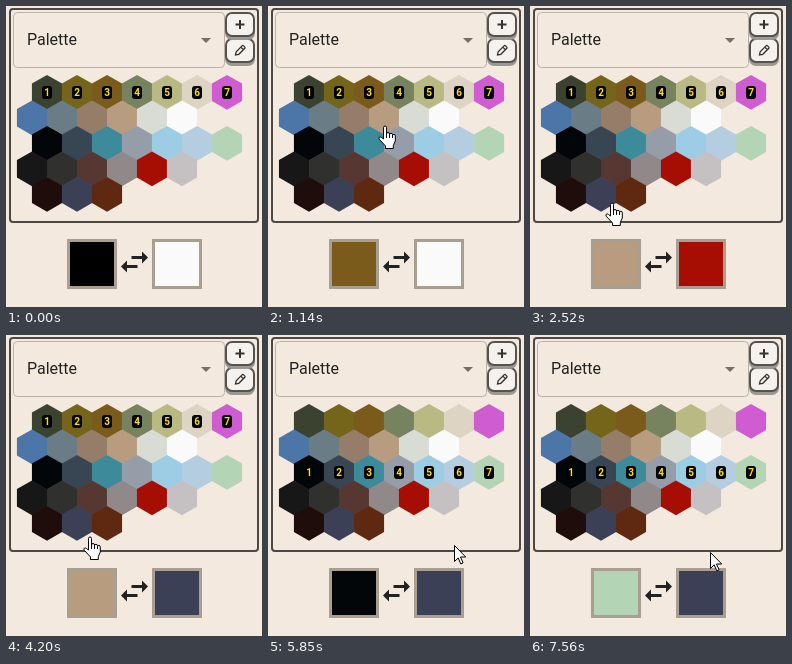
An HTML page with a canvas that plays this animation: 256x301 px, repeating every 8000 ms.

```html
<!DOCTYPE html>
<html lang="en">
<head>
<meta charset="utf-8">
<title>Palette</title>
<style>
  html, body { margin: 0; width: 100%; height: 100%; overflow: hidden; background: #f3e9de; }
  canvas { display: block; }
</style>
</head>
<body>
<canvas id="stage" width="256" height="301"></canvas>
<script>
const ctx = document.getElementById('stage').getContext('2d');
const LOOP = 8000, STEP = 30;

const palette = [
  ['#3c4230', '#75651b', '#7a5b1c', '#77835f', '#b9b984', '#ded4c4', '#cf5dd1'],
  ['#4c76a8', '#6a7c85', '#967d6a', '#b89c80', '#d9dbd5', '#fafafa'],
  ['#020608', '#384653', '#3d8a9b', '#959da8', '#9dcce5', '#b5cde1', '#b4d4b6'],
  ['#171717', '#30302f', '#563732', '#908889', '#a60d03', '#c5c1c2'],
  ['#1e0d0b', '#3c4057', '#5f2810'],
];
const cells = palette.flatMap((row, r) => row.map((color, i) =>
  ({ row: r, label: i + 1, color, x: (r % 2 ? 26 : 41) + 30 * i, y: 86.3 + 25.5 * r })));

// Each entry holds from its time onward.
const primary = [
  [0, '#000'], [840, palette[0][2]], [1380, palette[1][3]],
  ...[5850, 6180, 6450, 6810, 7080, 7320, 7560].map((time, i) => [time, palette[2][i]]),
];
const secondary = [[0, '#fafafa'], [2250, palette[3][4]], [3090, palette[4][1]]];
const labelledRow = [[0, 0], [4620, 1], [5160, 2]];

// Pointer hotspot: time, x, y.
const pointerPath = [
  [60, 250, 0], [630, 100, 86], [930, 100, 86], [1140, 116, 119],
  [1560, 116, 119], [2040, 144, 168], [2280, 144, 168], [2520, 81, 196],
  [2610, 75, 197], [2790, 75, 197], [2850, 73, 193], [4170, 73, 193],
  [4200, 83, 201], [4320, 98, 205], [4500, 98, 205], [4860, 121, 177],
  [5310, 186, 210], [5880, 186, 210], [5940, 176, 171], [6030, 180, 217],
  [LOOP, 180, 217],
];

const arrow = new Path2D('M.5.5v16l3.7-3.6 2.6 6 2.3-1-2.6-5.9h5.2z');
const hand = new Path2D('M5.5 14V2.5a1.5 1.5 0 0 1 3 0V9a1.5 1.5 0 0 1 3 0v.8a1.5 1.5 0 0 1 3 0v1a1.4 1.4 0 0 1 2.8 0V16l-2 4.5v3H7.5V21L1.2 14.2c-1.2-1.8 1-3 2.3-1.7z');
const knuckles = new Path2D('M8.5 9v4M11.5 10v3M14.5 11v2');
const swap = new Path2D('M6.99 11 3 15l3.99 4v-3H14v-2H6.99v-3zM21 9l-3.99-4v3H10v2h7.01v3L21 9z');
const pencil = new Path2D('M-4.5 4.5l.7-3.3L2-4.6q.8-.8 1.6 0l1 1q.8.8 0 1.6L-1.2 3.8zM.8-3.4l2.6 2.6');
const plus = new Path2D('M-4.5 0h9M0-4.5v9');
const dropDown = new Path2D('M195 32l5 5 5-5z');

const valueAt = (track, t) => track.findLast(([time]) => time <= t)[1];

function pointerAt(t) {
  const i = pointerPath.findIndex(([time]) => time > t);
  if (i < 1) return null;
  const [t0, x0, y0] = pointerPath[i - 1], [t1, x1, y1] = pointerPath[i];
  const u = (t - t0) / (t1 - t0), k = u * (2 - u);
  return { x: x0 + (x1 - x0) * k, y: y0 + (y1 - y0) * k };
}

function box(x, y, w, h, radius, fill, stroke, lineWidth) {
  ctx.beginPath();
  ctx.roundRect(x, y, w, h, radius);
  if (fill) { ctx.fillStyle = fill; ctx.fill(); }
  if (stroke) { ctx.strokeStyle = stroke; ctx.lineWidth = lineWidth; ctx.stroke(); }
}

function at(x, y, scale, draw) {
  ctx.save();
  ctx.translate(x, y);
  ctx.scale(scale, scale);
  draw();
  ctx.restore();
}

function text(string, x, y, font, color, align) {
  ctx.font = font;
  ctx.fillStyle = color;
  ctx.textAlign = align;
  ctx.fillText(string, x, y);
}

function button(y, icon, width) {
  box(219, y + 2, 30, 26, 7, '#9b9793');
  box(220, y + 1, 28, 23, 6, '#f5f2ee', '#56524e', 2);
  at(234, y + 12.5, 1, () => {
    ctx.strokeStyle = '#333';
    ctx.lineWidth = width;
    ctx.stroke(icon);
  });
}

function hexagon({ x, y, color }) {
  ctx.beginPath();
  for (let i = 0; i < 6; i++) {
    const a = Math.PI * (i / 3 + 1 / 6);
    ctx.lineTo(x + 17.4 * Math.cos(a), y + 17.4 * Math.sin(a));
  }
  ctx.fillStyle = color;
  ctx.fill();
}

function swatch(x, color) {
  box(x, 233, 50, 50, 0, '#a89e92');
  box(x + 3, 236, 44, 44, 0, color);
}

function drawPointer({ x, y }, isHand) {
  at(Math.round(x) - (isHand ? 6 : 0), Math.round(y), 1, () => {
    ctx.fillStyle = '#fff';
    ctx.strokeStyle = '#000';
    ctx.lineWidth = 1;
    ctx.fill(isHand ? hand : arrow);
    ctx.stroke(isHand ? hand : arrow);
    if (isHand) ctx.stroke(knuckles);
  });
}

function render(t) {
  const pointer = pointerAt(t);
  const inside = (x, y, w, h) => pointer && pointer.x >= x && pointer.x < x + w
    && pointer.y >= y && pointer.y < y + h;
  const overSelect = inside(7, 6, 212, 56);
  const overButton = inside(220, 6, 28, 52);
  const overCell = pointer && cells.some(c => Math.hypot(c.x - pointer.x, c.y - pointer.y) < 18);

  box(0, 0, 256, 301, 0, '#f3e9de');
  box(4, 3, 248, 213, 3, null, '#4d4843', 2);
  box(7.5, 6.5, 211, 55, 4, null, overSelect ? '#222' : '#bbb3aa', 1);
  text('Palette', 21, 39, '16px Roboto, sans-serif', '#222', 'left');
  ctx.fillStyle = '#756f69';
  ctx.fill(dropDown);
  button(32, pencil, 1.3);
  button(6, plus, 2);

  cells.forEach(hexagon);
  const row = valueAt(labelledRow, t);
  for (const c of cells.filter(cell => cell.row === row)) {
    const y = Math.round(c.y);
    box(c.x - 5, y - 6, 10, 13, 3, '#000');
    text(c.label, c.x, y + 4, 'bold 10px Roboto, sans-serif', '#ffe000', 'center');
  }

  swatch(61, valueAt(primary, t));
  swatch(146, valueAt(secondary, t));
  at(110.5, 238, 1.5, () => {
    ctx.fillStyle = '#222';
    ctx.fill(swap);
  });

  if (pointer) drawPointer(pointer, overSelect || overButton || overCell);
}

const start = performance.now();
function tick() {
  const t = (performance.now() - start) % LOOP;
  render(Math.floor(t / STEP) * STEP);
  requestAnimationFrame(tick);
}
tick();
</script>
</body>
</html>
```
